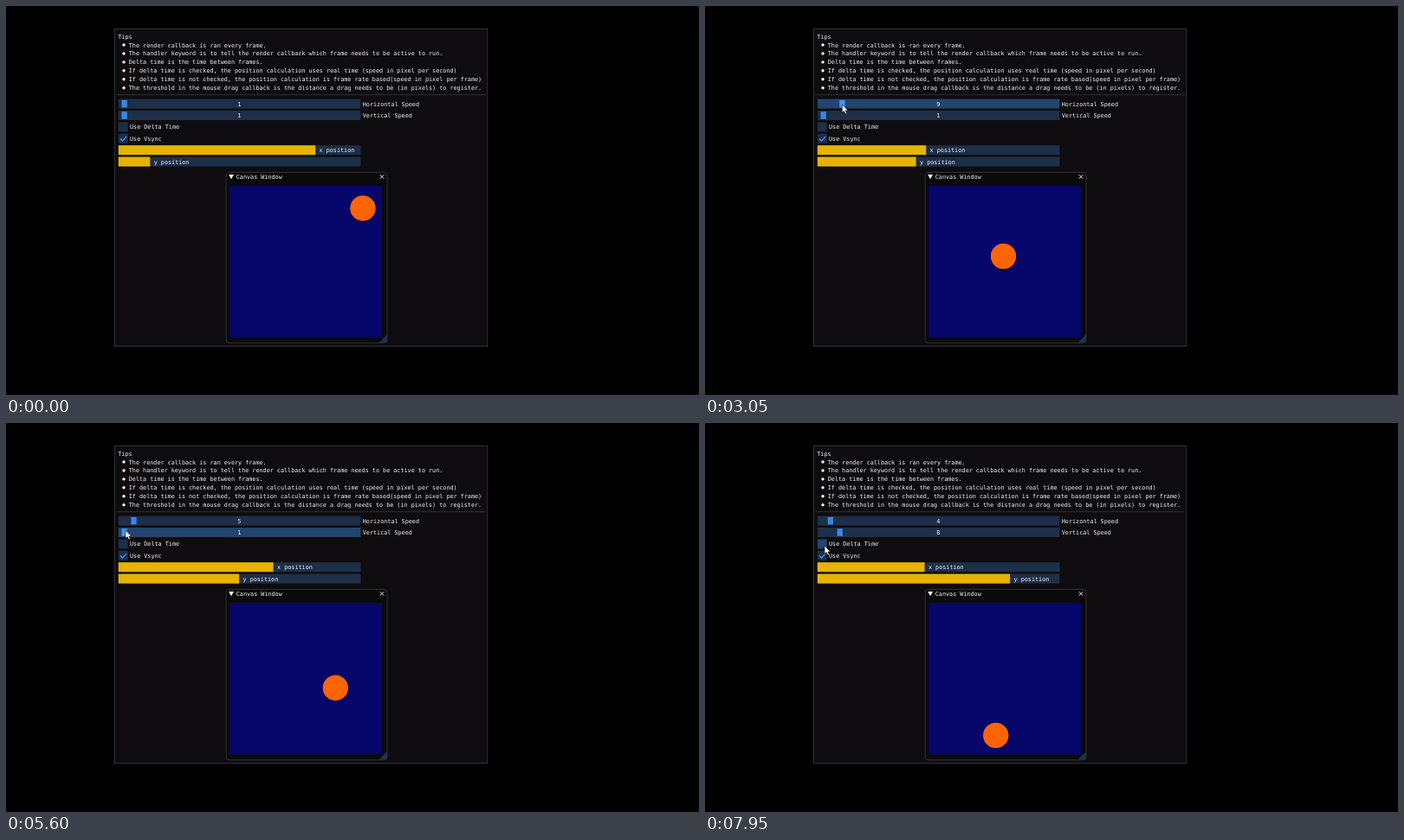
Write an HTML page that moves like this. It is 800 by 450 pixels and loops after 8 s.

```html
<!DOCTYPE html>
<html lang="en">
<head>
<meta charset="utf-8">
<title>Canvas speed demo</title>
<style>
  html, body { margin: 0; width: 100%; height: 100%; overflow: hidden; background: #000; }
  svg { display: block; width: 100vw; height: 100vh; }
  text { font: 6.78px "DejaVu Sans Mono", monospace; fill: #f4f4f4; white-space: pre; text-rendering: geometricPrecision; }
</style>
</head>
<body>
<svg id="stage" viewBox="0 0 800 450"></svg>
<script>
const LOOP = 8000, STEP = 50, TICK = 1000 / 60;
const PANEL = '#0e0c0f', LINE = '#3b3b41', FRAME = '#1d2f49', HOVER = '#23456e', GRAB = '#3d85e0', ACTIVE = '#4296fa';
const LEFT = 129.8, WIDTH = 279.6, ROW_H = 11;
const CANVAS = { x: 258, y: 208, w: 176, h: 175.4, units: 300 };
const RADIUS = 25, BAR_MAX = 340, BAR_SHIFT = 14;
const rowY = i => 107.6 + i * 13.4;
const knobX = v => 136.5 + (v - 1) * 2.726;
const valueAt = x => Math.max(1, Math.round(1 + (x - 136.5) / 2.726));

const stage = document.getElementById('stage');

function set(el, attrs) {
  for (const k in attrs) el.setAttribute(k, attrs[k]);
}
function add(tag, attrs, content = '') {
  const el = document.createElementNS('http://www.w3.org/2000/svg', tag);
  set(el, attrs);
  el.textContent = content;
  return stage.appendChild(el);
}
const box = (x, y, width, height, fill, more) => add('rect', { x, y, width, height, fill, ...more });
const label = (x, y, s, more) => add('text', { x, y, ...more }, s);
const path = (d, more) => add('path', { d, fill: 'none', ...more });

// Main window
box(125.4, 26.6, 430.4, 367, PANEL, { stroke: LINE, 'stroke-width': 0.8 });
label(129.3, 37.6, 'Tips');
[
  'The render callback is ran every frame.',
  'The handler keyword is to tell the render callback which frame needs to be active to run.',
  'Delta time is the time between frames.',
  'If delta time is checked, the position calculation uses real time (speed in pixel per second)',
  'If delta time is not checked, the position calculation is frame rate based(speed in pixel per frame)',
  'The threshold in the mouse drag callback is the distance a drag needs to be (in pixels) to register.'
].forEach((s, i) => {
  const y = 45 + i * 9.94;
  add('circle', { cx: 136, cy: y, r: 1.7, fill: '#fff' });
  label(141.8, y + 2.5, s);
});
box(127.5, 102.4, 426, 0.7, LINE);

function slider(row, name) {
  const y = rowY(row);
  const track = box(LEFT, y, WIDTH, ROW_H, FRAME);
  const grab = box(0, y + 1.2, 6.3, ROW_H - 2.4, GRAB);
  const value = label(269.3, y + 8, '', { 'text-anchor': 'middle' });
  label(411.8, y + 8, name);
  return (v, hot) => {
    set(track, { fill: hot ? HOVER : FRAME });
    set(grab, { x: knobX(v) - 3, fill: hot ? ACTIVE : GRAB });
    value.textContent = v;
  };
}

function checkbox(row, name) {
  const r = box(LEFT, rowY(row), ROW_H, ROW_H, FRAME);
  label(143, rowY(row) + 8, name);
  return hot => set(r, { fill: hot ? HOVER : FRAME });
}

function progress(row, name) {
  const y = rowY(row);
  box(LEFT, y, WIDTH, ROW_H, FRAME);
  const fill = box(LEFT, y, 0, ROW_H, '#e6b300');
  const text = label(0, y + 8, name);
  return f => {
    const w = WIDTH * Math.max(0, Math.min(1, f));
    set(fill, { width: w });
    set(text, { x: Math.min(LEFT + w + 4.4, 366) });
  };
}

const showH = slider(0, 'Horizontal Speed');
const showV = slider(1, 'Vertical Speed');
const showDelta = checkbox(2, 'Use Delta Time');
checkbox(3, 'Use Vsync');
path('M132 153.6l2.4 2.5l4.6-5', { stroke: ACTIVE, 'stroke-width': 1.4 });
const showX = progress(4, 'x position');
const showY = progress(5, 'y position');

// Canvas window
box(254.2, 192.4, 185.8, 197.4, '#0a0a0b', { rx: 4, stroke: LINE, 'stroke-width': 0.8 });
path('M257.2 195.1h5.8l-2.9 5.2z', { fill: '#fff' });
label(265.8, 200.2, 'Canvas Window');
path('M431.8 195.3l4.4 4.4m0-4.4l-4.4 4.4', { stroke: '#fff', 'stroke-width': 0.9 });
box(CANVAS.x, CANVAS.y, CANVAS.w, CANVAS.h, '#06066b');
path('M440 380v7q0 2.6-2.6 2.6H430.4z', { fill: '#1b3355' });
const ball = add('circle', { r: 14.7, fill: '#ff6400' });
const cursor = path('M0 0v9.6l2.2-2l1.6 3.4l1.7-.8l-1.6-3.3h3z',
  { fill: '#fff', stroke: '#000', 'stroke-width': 0.6 });

// Mouse moves: start, end, x, y; it rests in between
const ENTER = 300;
const moves = [
  [ENTER, 700, knobX(1), 114],
  [850, 1608, knobX(54), 114],
  [1950, 2583, knobX(9), 114],
  [4210, 4350, knobX(5), 114],
  [4900, 5200, 138, 124],
  [6038, 6238, knobX(8), 124],
  [6600, 6850, 150, 117],
  [7150, 7400, knobX(1), 117],
  [7400, 7650, knobX(4), 117],
  [7700, 7900, 138, 142]
];

function mouseAt(t) {
  let x = 300, y = 372;
  for (const [from, to, mx, my] of moves) {
    const k = Math.max(0, Math.min(1, (t - from) / (to - from)));
    x += (mx - x) * k;
    y += (my - y) * k;
  }
  return { x, y };
}

// Press and release times of the drags on each slider
const drags = { h: [[850, 4400], [7150, 7680]], v: [[6038, 6300]] };

function valueOf(name, t) {
  let v = 1;
  for (const [down, up] of drags[name])
    if (t >= down) v = valueAt(mouseAt(Math.min(t, up)).x);
  return v;
}

// One axis of the ball: moves by the slider value every tick, bounces
// off the walls and turns round when a drag callback fires
function track(name, pos, dir, turns) {
  const low = RADIUS, high = CANVAS.units - RADIUS, out = [];
  for (let t = 0; t < LOOP; t += TICK) {
    out.push(pos);
    if (turns.some(k => k >= t && k < t + TICK)) dir = -dir;
    pos += dir * valueOf(name, t + TICK / 2);
    if (pos < low || pos > high) {
      pos = 2 * (pos < low ? low : high) - pos;
      dir = -dir;
    }
  }
  return out;
}
const xs = track('h', 262.5, -1, [5690]);
const ys = track('v', 44.4, 1, [1800, 2517, 4567]);

function render(t) {
  const m = mouseAt(t), shown = t >= ENTER;
  const over = (row, w = WIDTH) => shown && m.x < LEFT + w && m.y >= rowY(row) && m.y <= rowY(row) + ROW_H;
  showH(valueOf('h', t), over(0));
  showV(valueOf('v', t), over(1));
  showDelta(over(2, ROW_H));

  const i = Math.round(t / TICK), last = Math.max(0, i - 1);
  set(ball, {
    cx: CANVAS.x + xs[i] * CANVAS.w / CANVAS.units,
    cy: CANVAS.y + ys[i] * CANVAS.h / CANVAS.units
  });
  // The bars show the position one tick late
  showX((xs[last] + BAR_SHIFT) / BAR_MAX);
  showY(ys[last] / BAR_MAX);

  set(cursor, { transform: `translate(${m.x} ${m.y})`, visibility: shown ? 'visible' : 'hidden' });
}

const start = performance.now();
function tick() {
  const t = (performance.now() - start) % LOOP;
  render(Math.floor(t / STEP) * STEP);
  requestAnimationFrame(tick);
}
tick();
</script>
</body>
</html>
```
